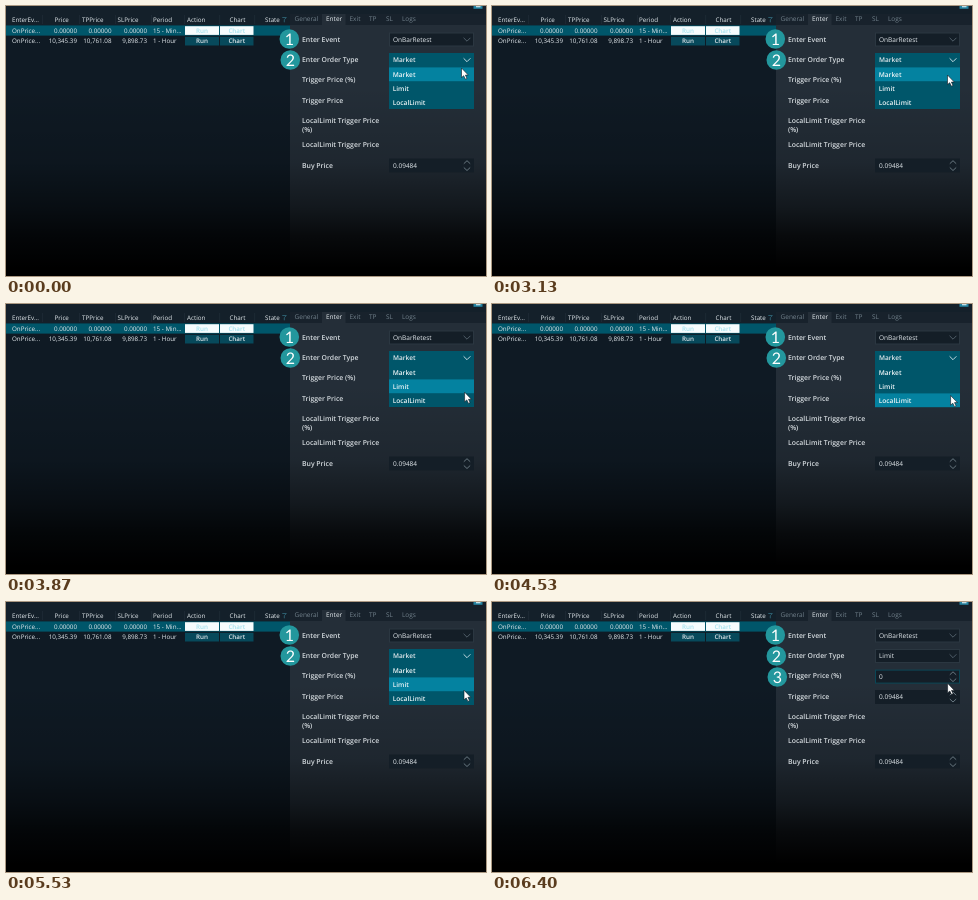
These frames come from a looping animation (480x270 px, 8 s). An HTML page:

```html
<!DOCTYPE html>
<html lang="en">
<head>
<meta charset="utf-8">
<title>Order type selection</title>
<style>
  html, body { margin: 0; width: 100%; height: 100%; overflow: hidden; background: #000; }
  svg { display: block; width: 100vw; height: 100vh; }
  text { font: 6.5px "Open Sans", "Noto Sans", sans-serif; fill: #e4eaee; text-rendering: geometricPrecision; }
  .cell { font-size: 6.25px; }
  .bold { font-weight: 600; }
  .option { font-weight: 600; font-size: 6.6px; fill: #eef6f8; }
  .label { font-weight: 600; font-size: 6.88px; fill: #d6dce0; }
  .dim { fill: #71808b; }
  .pale { fill: #a4e2ee; }
  .num { font: 16px Lato, sans-serif; fill: #fff; }
  .line { fill: none; stroke-width: .9; }
</style>
</head>
<body>
<svg id="stage" viewBox="0 0 480 270" preserveAspectRatio="none">
  <defs>
    <linearGradient id="fade" x1="0" y1="0" x2="0" y2="1">
      <stop offset="0.3" stop-color="#000" stop-opacity="0"/>
      <stop offset="0.58" stop-color="#000" stop-opacity="0.16"/>
      <stop offset="0.74" stop-color="#000" stop-opacity="0.47"/>
      <stop offset="0.85" stop-color="#000" stop-opacity="0.78"/>
      <stop offset="0.97" stop-color="#000"/>
    </linearGradient>
  </defs>
</svg>
<script>
const stage = document.getElementById('stage');
const TEAL = '#00566a', HOVER = '#0482a0', FIELD = '#141e27', EDGE = '#2b3741';

function add(tag, attrs, parent = stage) {
  const el = document.createElementNS('http://www.w3.org/2000/svg', tag);
  for (const key in attrs) el.setAttribute(key, attrs[key]);
  parent.appendChild(el);
  return el;
}
const group = () => add('g', {});
const rect = (x, y, width, height, fill, parent, more) =>
  add('rect', { x, y, width, height, fill, ...more }, parent);
function text(str, x, y, cls = '', parent, anchor = 'start') {
  const el = add('text', { x, y, class: cls, 'text-anchor': anchor }, parent);
  el.textContent = str;
  return el;
}
const line = (d, stroke, parent) => add('path', { d, stroke, class: 'line' }, parent);

function combo(y, value, parent, open) {
  rect(383.5, y + .5, 84, 13, open ? TEAL : FIELD, parent, { stroke: open ? TEAL : EDGE });
  text(value, 387, y + 9.4, open ? 'bold' : '', parent);
  line(`M457.6 ${y + 5.3}l3.4 3.4 3.4 -3.4`, open ? '#d5e6ec' : '#566570', parent);
}
function spinner(y, value, parent, edge = FIELD) {
  rect(383.5, y + .5, 84, 13, FIELD, parent, { stroke: edge });
  text(value, 387, y + 9.4, '', parent);
  line(`M457.8 ${y + 5.2}l3.2 -3 3.2 3M457.8 ${y + 9}l3.2 3 3.2 -3`, '#71808a', parent);
}
function badge(n, x, y) {
  const g = group();
  add('circle', { cx: x, cy: y, r: 9.8, fill: '#23979d' }, g);
  text(n, x, y + 5.6, 'num', g, 'middle');
  return g;
}

// backgrounds
rect(0, 0, 284, 270, '#0f1a24');
rect(0, 0, 480, 19, '#14202a');
rect(284, 8, 196, 11, '#18222c');
rect(284, 19, 196, 251, '#242e38');
rect(316, 8, 23.5, 11, '#242e38');
rect(0, 0, 480, 270, 'url(#fade)');
rect(467.5, 0, 9, 2.8, '#2484a2');
rect(470, 0, 4.5, 1.3, '#c4dde5');

// table
[36, 73, 109, 145, 178, 213.5, 248.5].forEach(x => rect(x, 9, .6, 9, '#22303b'));
[['EnterEv...', 6], ['Price', 48.5], ['TPPrice', 76], ['SLPrice', 111.5], ['Period', 147],
 ['Action', 181], ['Chart', 223.5], ['State', 259]]
  .forEach(([name, x]) => text(name, x, 15.8, 'cell'));
line('M276.3 11.5h4l-2 2.2v2.6', '#2f6576');

function row(y, values, period, active) {
  if (active) rect(0, y, 284, 10.2, TEAL);
  text('OnPrice...', 6, y + 7.3, 'cell');
  values.forEach((v, i) => text(v, [71, 105.5, 141][i], y + 7.3, 'cell', stage, 'end'));
  text(period, 147, y + 7.3, 'cell');
  [['Run', 179, 34], ['Chart', 214, 33.5]].forEach(([name, x, w]) => {
    rect(x, y + .8, w, 8.7, active ? '#f6fcfd' : '#07495b');
    text(name, x + w / 2, y + 7.3, 'cell bold' + (active ? ' pale' : ''), stage, 'middle');
  });
}
row(19.4, ['0.00000', '0.00000', '0.00000'], '15 - Min...', true);
row(30, ['10,345.39', '10,761.08', '9,898.73'], '1 - Hour', false);

// settings panel
[['General', 288.5], ['Enter', 320], ['Exit', 343.5], ['TP', 363], ['SL', 380], ['Logs', 396]]
  .forEach(([name, x], i) => text(name, x, 15.4, i === 1 ? '' : 'dim'));
[['Enter Event', 35.7], ['Enter Order Type', 56], ['Trigger Price (%)', 76.3],
 ['Trigger Price', 96.8], ['LocalLimit Trigger Price', 117.3], ['(%)', 125.8],
 ['LocalLimit Trigger Price', 141.3], ['Buy Price', 161.6]]
  .forEach(([name, y]) => text(name, 296, y, 'label'));
combo(26.5, 'OnBarRetest');
spinner(152.5, '0.09484');

const closed = group();
combo(47, 'Limit', closed);
spinner(67.6, '0', closed, '#0a4656');
spinner(88, '0.09484', closed);

// open list
const list = group();
combo(47, 'Market', list, true);
rect(383, 61, 85, 42, TEAL, list);
const bar = rect(383, 61.4, 85, 13.8, HOVER, list);
['Market', 'Limit', 'LocalLimit'].forEach((name, i) => text(name, 386.7, 70.6 + 14 * i, 'option', list));

badge('1', 283.3, 33);
badge('2', 284.3, 54);
const third = badge('3', 285.3, 75);

const pointer = add('path', {
  d: 'M0 0V9.6L2.2 7.7 3.9 11.2 5.5 10.4 3.9 7.1H6.8Z',
  fill: '#fff', stroke: '#101820', 'stroke-width': .6, 'stroke-linejoin': 'round'
});

// [tick, x, y] at 15 ticks per second
const path = [
  [0, 455.5, 62], [5, 455.5, 67], [7, 455.5, 67.2], [8, 455.5, 67.8], [46, 455.5, 67.8],
  [47, 455.5, 69], [50, 457.5, 86], [54, 457.5, 86], [58, 458.6, 88.2], [62, 458.6, 91.5],
  [73, 458.6, 91.5], [79, 458.3, 90], [82, 458.3, 90], [83, 458, 88.2], [86, 456, 82],
  [87, 456, 82], [90, 455.6, 81.3], [120, 455.6, 81.3]
];
const picks = [[83, 1], [59, 2], [48, 1], [0, 0]];
const CLOSE = 88, SHOWN = 96;

function draw(tick) {
  const i = Math.max(1, path.findIndex(p => p[0] >= tick));
  const [a, ax, ay] = path[i - 1], [b, bx, by] = path[i];
  const k = (tick - a) / (b - a);
  pointer.setAttribute('transform', `translate(${ax + (bx - ax) * k} ${ay + (by - ay) * k})`);

  const pick = picks.find(p => tick >= p[0])[1];
  bar.setAttribute('y', 61.4 + 14 * pick);
  const open = tick < CLOSE;
  list.style.display = open ? '' : 'none';
  closed.style.display = open ? 'none' : '';
  third.style.opacity = Math.min(1, Math.max(0, (tick - 90) / (SHOWN - 90)));
}

const start = performance.now();
function loop(now) {
  const t = Math.max(0, now - start) % 8000;
  draw(Math.min(119, Math.floor((t + 4) * 15 / 1000)));
  requestAnimationFrame(loop);
}
draw(0);
requestAnimationFrame(loop);
</script>
</body>
</html>
```
